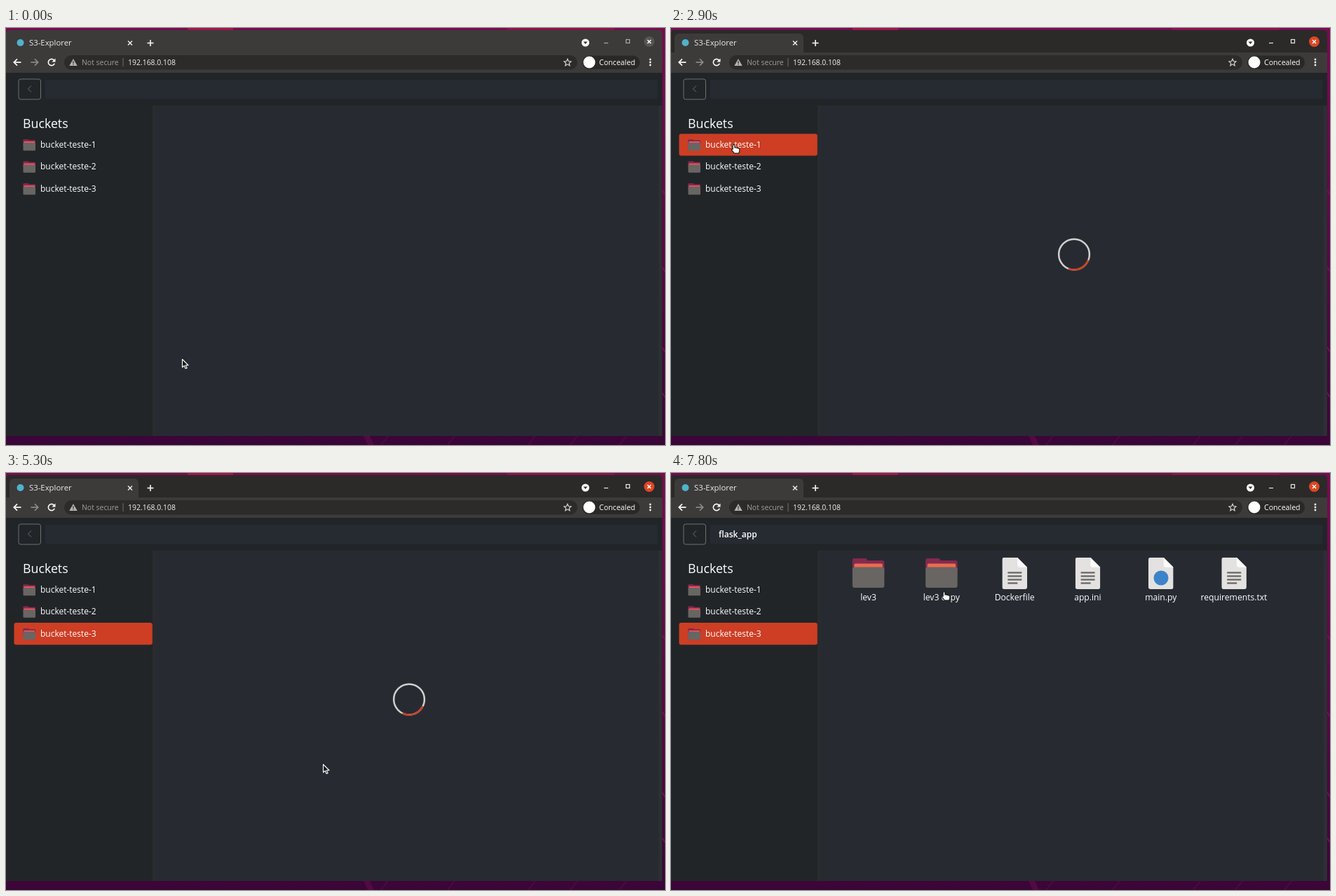
Recreate the animation shown at these times as an HTML page with a canvas. Size 940 by 596 pixels, loop 8000 ms.

```html
<!DOCTYPE html>
<html lang="en">
<head>
<meta charset="utf-8">
<title>Bucket browser</title>
<style>
html, body { margin: 0; width: 100%; height: 100%; overflow: hidden; background: #3a0637; }
canvas { display: block; width: 940px; height: 596px; }
</style>
</head>
<body>
<canvas id="stage" width="940" height="596"></canvas>
<script>
const ctx = document.getElementById('stage').getContext('2d');
const LOOP = 8000, STEP = 100;
const FONT = '"Open Sans", "Noto Sans", sans-serif';
const ACCENT = '#cd3e24';
const COLUMN = 104.3, FIRST = 281.5;

// Each view lasts until the next one starts.
const views = [
  { at: 0 },
  { at: 1800, spin: { ref: 2000, deg: -5, stop: 2900 } },
  { at: 3300, items: [['text', '2021214Bve-ec…'], ['text', '2021214vbu-ec…'], ['script', '2021214wpr-cr…']] },
  { at: 4200, spin: { ref: 5300, deg: 71, stop: 5300 } },
  { at: 5500, items: [['folder', 'flask_app'], ['folder', 'lev1'], ['folder', 'lev2'], ['text', 'Dockerfile'], ['python', 'main.py']] },
  { at: 6500, spin: { ref: 6600, deg: -12, stop: 7300 } },
  { at: 7400, items: [['folder', 'lev3'], ['folder', 'lev3 copy'], ['text', 'Dockerfile'], ['text', 'app.ini'], ['python', 'main.py'], ['text', 'requirements.txt']] }
];

// Pointer stops: time, x, y.
const stops = [
  [0, 251, 473], [300, 251, 473], [600, 98, 193], [700, 98, 193], [900, 87, 167],
  [1100, 87, 167], [1200, 86, 166], [3200, 86, 166], [3600, 124, 250], [3700, 124, 250],
  [3800, 114, 244], [4000, 105, 224], [4500, 105, 224], [5000, 441, 411], [5300, 452, 416],
  [5700, 452, 416], [6100, 268, 140], [6400, 268, 140], [6600, 313, 180], [7000, 388, 169],
  [7700, 388, 169], [7800, 386, 169], [LOOP, 386, 169]
];

const arrow = new Path2D('M.5 .5V12L3.2 9.6 5.1 13.8 7.1 12.9 5.2 9H9Z');
const hand = new Path2D('M3.3 .6C4.4 .6 4.9 1.2 4.9 2.2V5.1C6 4.5 7 4.8 7.3 5.4 8.4 5 9.3 5.3 9.6 6 10.9 5.8 11.7 6.4 11.7 7.6V9.8L10.7 13H4.4L.7 8.7C.2 7.6 1.2 6.6 2.1 7.3V2.2C2.1 1.2 2.5 .6 3.3 .6Z');

function rect(x, y, w, h, color, r = 0) {
  ctx.fillStyle = color;
  ctx.beginPath();
  ctx.roundRect(x, y, w, h, r);
  ctx.fill();
}

function disc(x, y, r, color) {
  ctx.fillStyle = color;
  ctx.beginPath();
  ctx.arc(x, y, r, 0, Math.PI * 2);
  ctx.fill();
}

function line(color, width, ...pts) {
  ctx.strokeStyle = color;
  ctx.lineWidth = width;
  ctx.beginPath();
  for (let i = 0; i < pts.length; i += 2) ctx.lineTo(pts[i], pts[i + 1]);
  ctx.stroke();
}

function poly(color, ...pts) {
  ctx.fillStyle = color;
  ctx.beginPath();
  for (let i = 0; i < pts.length; i += 2) ctx.lineTo(pts[i], pts[i + 1]);
  ctx.fill();
}

function arc(x, y, r, from, to, color, width) {
  ctx.strokeStyle = color;
  ctx.lineWidth = width;
  ctx.beginPath();
  ctx.arc(x, y, r, from, to);
  ctx.stroke();
}

function text(str, x, y, size, color = '#fff', align = 'left', weight = 400) {
  ctx.font = `${weight} ${size}px ${FONT}`;
  ctx.textAlign = align;
  ctx.fillStyle = color;
  ctx.fillText(str, x, y);
}

function cross(x, y, r, color) {
  line(color, 1.5, x - r, y - r, x + r, y + r);
  line(color, 1.5, x - r, y + r, x + r, y - r);
}

function wallpaper() {
  const g = ctx.createLinearGradient(0, 0, 0, 596);
  g.addColorStop(0, '#780b50');
  g.addColorStop(0.5, '#5c0846');
  g.addColorStop(1, '#3a0637');
  ctx.fillStyle = g;
  ctx.fillRect(0, 0, 940, 596);
  rect(259, 0, 65, 3, '#a5134f');
  rect(715, 0, 153, 3, '#8f104f');
  poly('#520a45', 510, 583, 519, 583, 525, 596, 516, 596);
  for (const x of [545, 640, 755, 815, 885]) line('#520a45', 1.5, x, 583, x - 10, 596);
  for (const y of [230, 340, 455, 520]) line('#7a1258', 1.5, 935, y, 940, y + 8);
}

function chrome(focused) {
  const bar = '#3c3b39';
  rect(0, 3, 936, 61, focused ? '#2b2a28' : bar, [5, 5, 0, 0]);
  if (focused) rect(5, 8, 184, 34, bar, 6);
  rect(0, 35, 936, 29, bar);

  disc(20.5, 21, 5, '#4fb3cc');
  text('S3-Explorer', 33, 25, 11.35, '#ecebe9');
  cross(177, 21.5, 3, '#eee');
  line('#eee', 1.7, 201.5, 21.5, 210.5, 21.5);
  line('#eee', 1.7, 206, 17, 206, 26);

  disc(826.5, 21, 5.5, '#fff');
  poly('#33322f', 823.5, 19.5, 829.5, 19.5, 826.5, 23);
  const control = focused ? '#e8e7e5' : '#aaa8a5';
  line(control, 1.2, 853, 21.5, 859, 21.5);
  ctx.lineWidth = 1.2;
  ctx.strokeRect(884.5, 16.5, 5, 5);
  disc(917.5, 19.5, 7.5, focused ? '#dc4724' : '#575552');
  cross(917.5, 19.5, 2.5, '#fff');

  line('#fff', 1.7, 21.5, 49, 11.5, 49);
  line('#fff', 1.7, 16, 44.3, 11.3, 49, 16, 53.7);
  line('#92908d', 1.6, 35.5, 49, 45.5, 49);
  line('#92908d', 1.6, 41, 44.3, 45.7, 49, 41, 53.7);
  arc(65, 49, 4.6, 0.4, 5.6, '#fff', 1.7);
  poly('#fff', 70.5, 43.5, 70.5, 48.5, 65.5, 48.5);

  rect(83, 39, 732, 20.5, '#2c2b29', 10);
  poly('#b5b3b0', 96, 44, 101.7, 54, 90.3, 54);
  rect(95.4, 47.2, 1.2, 3.6, '#2c2b29');
  rect(95.4, 51.6, 1.2, 1.2, '#2c2b29');
  text('Not secure', 108, 53, 10.45, '#a09e9b');
  rect(166.5, 43, 1, 12, '#71706d');
  text('192.168.0.108', 174, 53, 10.45, '#f4f3f1');
  star(801, 49.5);

  rect(822, 39.5, 82, 19.5, '#292826', 10);
  disc(832, 49, 8.5, '#fff');
  text('Concealed', 846, 53, 10.6);
  for (const y of [45, 49, 53]) disc(919, y, 1.4, '#eee');
}

function star(x, y) {
  ctx.beginPath();
  for (let i = 0; i < 10; i++) {
    const a = (i / 5 - 0.5) * Math.PI, r = i % 2 ? 2.4 : 5.3;
    ctx.lineTo(x + r * Math.cos(a), y + r * Math.sin(a));
  }
  ctx.closePath();
  ctx.strokeStyle = '#dddbd8';
  ctx.lineWidth = 1.1;
  ctx.stroke();
}

function folder(x, y, scale) {
  ctx.save();
  ctx.translate(x, y);
  ctx.scale(scale, scale);
  rect(0, 0, 21, 12, '#842a4f', 3);
  rect(0, 3, 45.5, 20, '#842a4f', 3);
  rect(2.5, 7.5, 40.5, 10, scale < 1 ? '#e9535a' : '#ec6b4f', 2);
  rect(0, 12.5, 45.5, 29.5, '#686563', 3);
  ctx.restore();
}

function file(kind, cx) {
  const x = cx - 17.7, y = 120.8, w = 35.6, h = 45.2, fold = 14;
  const dark = kind === 'script';
  ctx.save();
  ctx.beginPath();
  ctx.roundRect(x, y, w, h, 3);
  ctx.clip();
  poly(dark ? '#4b4a4a' : '#e3e2e0', x, y, x + w - fold, y, x + w, y + fold, x + w, y + h, x, y + h);
  ctx.restore();
  poly(dark ? '#636262' : '#fafafa', x + w - fold, y, x + w, y + fold, x + w - fold + 2, y + fold, x + w - fold, y + fold - 2);
  if (kind === 'text') {
    for (let i = 0; i < 4; i++) rect(cx - 9.8, 141.3 + i * 5, i === 3 ? 14 : 20, 2.3, '#696867');
  } else if (dark) {
    text('#!', cx, 157.5, 24, '#fff', 'center', 600);
  } else {
    disc(cx + 0.3, 150, 10.5, '#3d83c9');
  }
}

function sidebar(selected) {
  text('Buckets', 24, 143, 17.8);
  for (let i = 0; i < 3; i++) {
    const y = 151.2 + i * 31.4;
    if (selected === i + 1) rect(11.5, y, 197.3, 31.4, ACCENT, 3);
    folder(24.5, y + 8, 0.385);
    text('bucket-teste-' + (i + 1), 49, y + 19.8, 12);
  }
}

function page(t, view) {
  rect(0, 64, 936, 519, '#212528');
  rect(209, 111, 727, 472, '#272b31');
  rect(209, 111, 5, 472, '#292b2e');
  rect(931, 111, 4.5, 472, '#2d3033');
  rect(56, 74, 873.5, 27.5, '#262b32', 2);
  ctx.strokeStyle = '#6a7075';
  ctx.lineWidth = 1;
  ctx.beginPath();
  ctx.roundRect(18, 73, 31.5, 29, 3);
  ctx.stroke();
  line('#6a7075', 1, 36, 82.5, 31.5, 87, 36, 91.5);
  if (t >= 6500) text('flask_app', 68, 92, 12.05, '#fff', 'left', 600);

  sidebar(t < 1800 ? 0 : t < 4200 ? 1 : 3);
  if (view.spin) spinner(t, view.spin);
  (view.items || []).forEach(([kind, label], i) => {
    const cx = FIRST + i * COLUMN;
    if (kind === 'folder') folder(cx - 22.7, 122, 1);
    else file(kind, cx);
    text(label, cx, 182, 12.15, '#fff', 'center');
  });
}

function spinner(t, { ref, deg, stop }) {
  const mid = (deg + (Math.min(t, stop) - ref) * 0.48) * Math.PI / 180;
  arc(575, 323.6, 21.9, 0, Math.PI * 2, '#d0d0ce', 2.5);
  arc(575, 323.6, 21.9, mid - Math.PI / 4, mid + Math.PI / 4, ACCENT, 2.5);
}

function tooltip() {
  rect(96, 179, 213, 20.5, '#f0f0f0');
  rect(97, 180, 211, 18.5, '#050505');
  text('cf-templates-1g14mba4i2zvk-us-east-1', 102, 193, 11.2);
}

function pointer(t, view) {
  const i = stops.findIndex(s => s[0] > t);
  const [t0, x0, y0] = stops[i - 1], [t1, x1, y1] = stops[i];
  const p = (t - t0) / (t1 - t0);
  const k = t1 - t0 > 200 ? p * p * (3 - 2 * p) : p;
  const x = x0 + (x1 - x0) * k, y = y0 + (y1 - y0) * k;

  const onBucket = x < 209 && y > 151 && y < 244;
  const onItem = (view.items || []).some((_, n) => Math.abs(x - FIRST - n * COLUMN) < 48) && y > 115 && y < 190;
  const over = onBucket || onItem;
  const shape = over ? hand : arrow;
  ctx.save();
  ctx.translate(Math.round(x), Math.round(y));
  ctx.lineJoin = 'round';
  ctx.lineWidth = 1.1;
  ctx.fillStyle = over ? '#fff' : '#191919';
  ctx.strokeStyle = over ? '#111' : '#fff';
  ctx.fill(shape);
  ctx.stroke(shape);
  ctx.restore();
}

function draw(now) {
  const t = Math.floor(now % LOOP / STEP) * STEP;
  const view = views.findLast(v => v.at <= t);
  wallpaper();
  chrome(t >= 1800);
  page(t, view);
  if (t === 1500) tooltip();
  pointer(t, view);
}

const start = performance.now();
function tick() {
  draw(performance.now() - start);
  requestAnimationFrame(tick);
}
tick();
</script>
</body>
</html>
```
